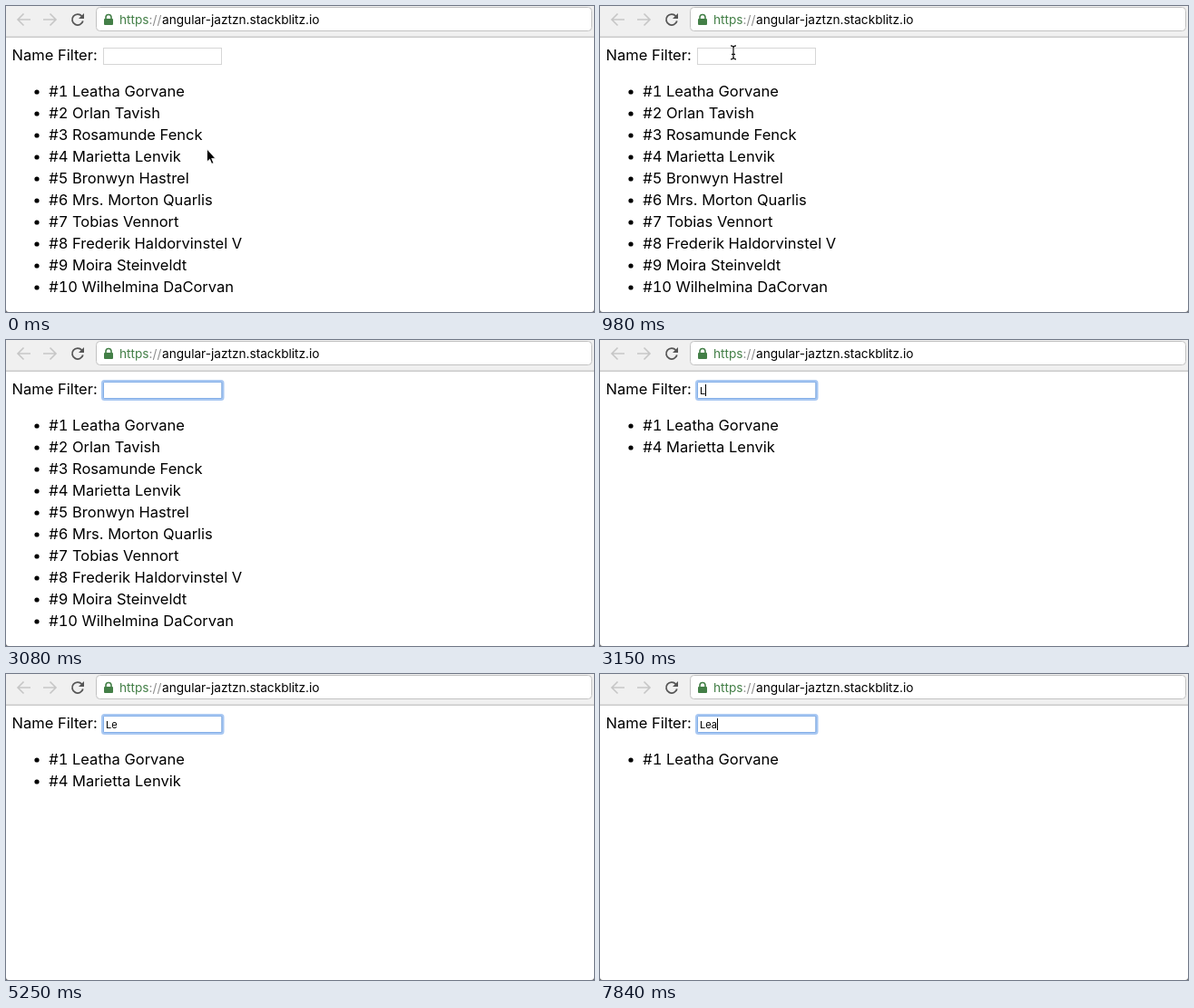
An HTML page for the animation above (8 s loop, 648 by 338 pixels).

```html
<!DOCTYPE html>
<html lang="en">
<head>
<meta charset="utf-8">
<title>Name filter</title>
<style>
  html, body { margin: 0; width: 100%; height: 100%; overflow: hidden; background: #fff; }
  svg { display: block; width: 100%; height: 100%; font-family: Inter, "Open Sans", sans-serif; }
  .page { font-size: 16.5px; }
  .url { font-size: 13.65px; }
  .typed { font-size: 11px; }
  .number { font-feature-settings: "tnum"; }
</style>
</head>
<body>
<svg viewBox="0 0 648 338">
  <defs>
    <path id="beamShape" d="M-3-7.5Q0-7.5 0-5Q0-7.5 3-7.5M0-5V5M-3 7.5Q0 7.5 0 5Q0 7.5 3 7.5M-2 2H2"/>
  </defs>

  <!-- Browser toolbar -->
  <rect width="648" height="33" fill="#f0f0f0"/>
  <rect y="33" width="648" height="1" fill="#dedede"/>
  <rect y="34" width="648" height="1" fill="#c9c9c9"/>
  <g fill="none" stroke="#c6c6c6" stroke-width="1.6">
    <path d="M27 15H13M19.5 8.5 13 15l6.5 6.5"/>
    <path d="M41 15h14M48.5 8.5 55 15l-6.5 6.5"/>
  </g>
  <path d="M83.6 11.2A6 6 0 1 0 84.8 16.5" fill="none" stroke="#555" stroke-width="1.8"/>
  <path d="M86 8v6h-6z" fill="#555"/>
  <rect x="99.5" y="1.5" width="546" height="26" rx="4" fill="#fff" stroke="#c2c2c2"/>
  <rect x="108" y="14" width="10" height="7" rx="1" fill="#437f47"/>
  <path d="M110 14.5v-2a3 3 0 0 1 6 0v2" fill="none" stroke="#437f47" stroke-width="1.6"/>
  <text class="url" x="125" y="20" fill="#437f47">https<tspan fill="#8c8c8c">://</tspan></text>
  <text class="url" x="172" y="20">angular-jaztzn.stackblitz.io</text>

  <!-- Page -->
  <text class="page" x="6.5" y="60">Name Filter:</text>
  <rect x="107.5" y="46.5" width="130" height="18" fill="#fff" stroke="#d6d6d6"/>
  <g id="focus" fill="none">
    <rect x="106.5" y="45.5" width="132.5" height="20" rx="2" stroke="#a9c8f2" stroke-width="3"/>
    <rect x="107.5" y="46.5" width="130.5" height="18" rx="1" stroke="#82aee8"/>
  </g>
  <text id="typed" class="typed" x="110" y="60"></text>
  <rect id="caret" y="49" width="1" height="13"/>
  <g id="list" class="page"></g>

  <path d="M0 338v-3q0 3 3 3zM648 338v-3q0 3-3 3z" fill="#666"/>

  <!-- Mouse pointers -->
  <path id="arrow" d="M0 0V14L3 11.2 5.2 16.3 7.3 15.4 5.2 10.4H9.3Z" stroke="#fff" stroke-width=".8"/>
  <g id="beam" fill="none">
    <use href="#beamShape" stroke="#fff" stroke-width="3"/>
    <use href="#beamShape" stroke="#111" stroke-width="1.2"/>
  </g>
</svg>
<script>
const LOOP = 8000, STEP = 70, ROW = 24;
const NAMES = [
  "Leatha Gorvane", "Orlan Tavish", "Rosamunde Fenck", "Marietta Lenvik",
  "Bronwyn Hastrel", "Mrs. Morton Quarlis", "Tobias Vennort",
  "Frederik Haldorvinstel V", "Moira Steinveldt", "Wilhelmina DaCorvan"
];
const TYPING = [[0, ""], [3150, "L"], [4690, "Le"], [5740, "Lea"]];
const CARET_TOGGLES = [1330, 1750, 2310, 2800, 3150, 3640, 4200, 5250, 5740, 6300, 6790, 7350, 7840];
const POINTER = [[0, 221.5, 158], [700, 142, 51.3], [910, 142, 51.3], [980, 147, 51.3], [1190, 143, 55]];
const FOCUS_AT = 1330, POINTER_HIDES_AT = 1610;

const $ = id => document.getElementById(id);
const show = (node, visible) => node.setAttribute("visibility", visible ? "visible" : "hidden");

function add(parent, tag, attrs, text = "") {
  const node = document.createElementNS("http://www.w3.org/2000/svg", tag);
  for (const key in attrs) node.setAttribute(key, attrs[key]);
  node.textContent = text;
  return parent.appendChild(node);
}

const rows = NAMES.map((name, i) => {
  const row = add($("list"), "g", {});
  const left = i < 9 ? 73 : 83.5;
  add(row, "circle", { cx: 34, cy: 95, r: 2.6 });
  add(row, "text", { x: 47.2, y: 100, class: "number" }, "#" + (i + 1));
  const label = add(row, "text", { x: left, y: 100 }, name);
  return { name, row, right: left + label.getComputedTextLength() };
});

function pointerAt(t) {
  const i = POINTER.findIndex(key => key[0] > t);
  if (i < 0) return POINTER.at(-1).slice(1);
  const [t0, x0, y0] = POINTER[i - 1], [t1, x1, y1] = POINTER[i];
  const p = (t - t0) / (t1 - t0), eased = p * p * (3 - 2 * p);
  return [x0 + (x1 - x0) * eased, y0 + (y1 - y0) * eased];
}

// The pointer is an I-beam over the input line and over list text.
function overText(x, y) {
  const row = rows[Math.floor((y - 82) / ROW)];
  return y < 65 || Boolean(row && x < row.right);
}

function draw(t) {
  const query = TYPING.findLast(([start]) => t >= start)[1];
  $("typed").textContent = query;
  show($("focus"), t >= FOCUS_AT);

  show($("caret"), CARET_TOGGLES.filter(time => time <= t).length % 2);
  $("caret").setAttribute("x", Math.round(110 + (query ? $("typed").getComputedTextLength() : 0)));

  let line = 0;
  for (const { name, row } of rows) {
    const matches = name.includes(query);
    show(row, matches);
    if (matches) row.setAttribute("transform", `translate(0 ${ROW * line++})`);
  }

  const [x, y] = pointerAt(Math.floor(t / STEP) * STEP);
  const visible = t < POINTER_HIDES_AT, beam = overText(x, y);
  for (const id of ["arrow", "beam"]) {
    show($(id), visible && beam === (id === "beam"));
    $(id).setAttribute("transform", `translate(${x} ${y})`);
  }
}

function tick() {
  draw(performance.now() % LOOP);
  requestAnimationFrame(tick);
}
tick();
</script>
</body>
</html>
```
